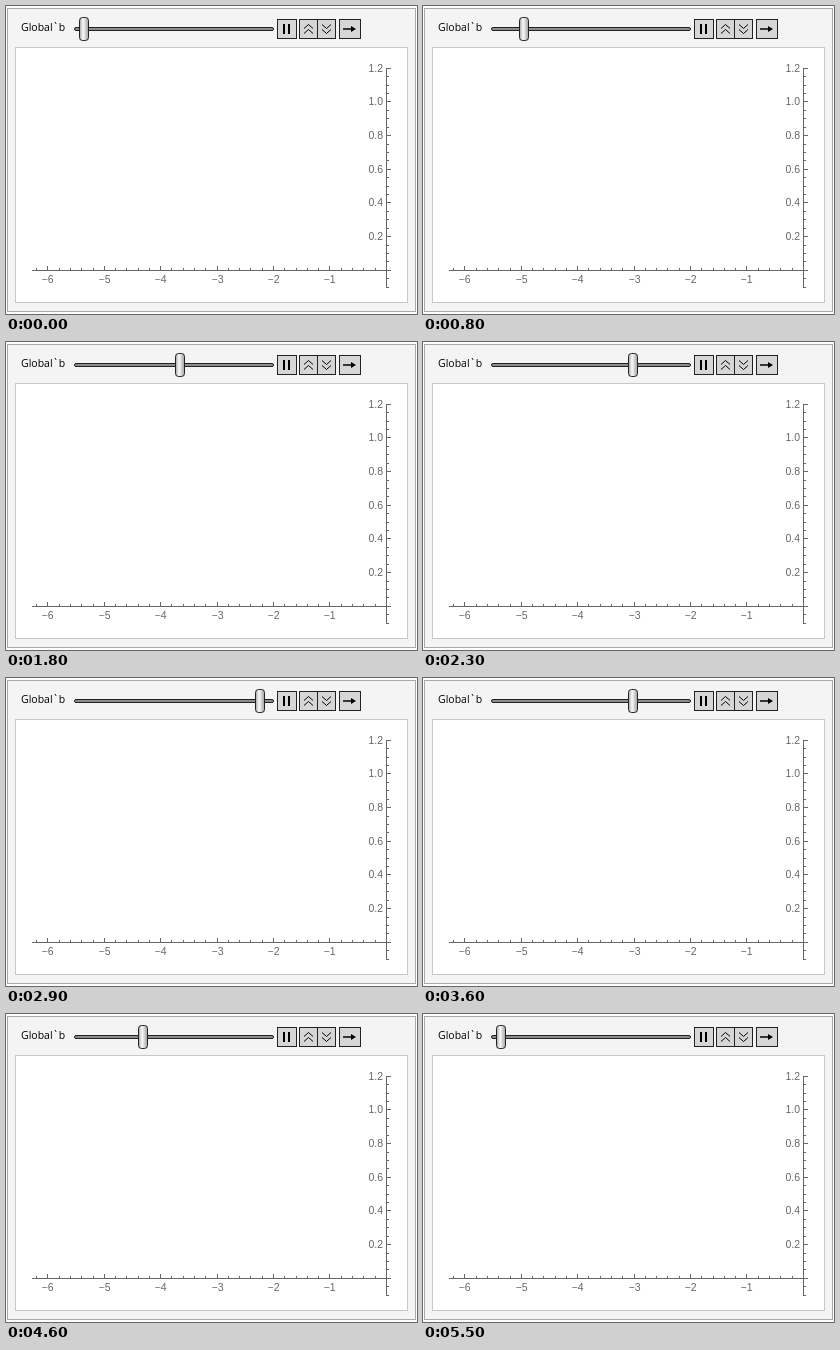
An HTML page that plays this animation: 411x308 px, repeating every 6 s.

```html
<!DOCTYPE html>
<html lang="en">
<head>
<meta charset="utf-8">
<title>Slider and axes</title>
<style>
html, body { margin: 0; width: 100%; height: 100%; overflow: hidden; background: #fff; }
svg { display: block; }
.name { font: 10.5px "Open Sans", sans-serif; }
.labels { font: 10.5px "Liberation Sans", Arial, sans-serif; fill: #666; }
.axes { stroke: #666; fill: none; shape-rendering: crispEdges; }
.button { fill: #d6d6d6; stroke: #222; }
.icon { fill: none; stroke: #000; }
</style>
</head>
<body>
<svg width="411" height="308" viewBox="0 0 411 308">
  <defs>
    <linearGradient id="metal">
      <stop offset="0" stop-color="#a4a4a4"/>
      <stop offset=".4" stop-color="#fafafa"/>
      <stop offset="1" stop-color="#a0a0a0"/>
    </linearGradient>
  </defs>
  <rect x="1.5" y="2.5" width="408" height="303" fill="#f4f4f4" stroke="#aaa"/>
  <rect x="9.5" y="41.5" width="392" height="255" fill="#fff" stroke="#c8c8c8"/>
  <text class="name" x="15" y="25">Global`b</text>

  <rect x="68.5" y="21.5" width="199" height="3" rx="1.5" fill="#8c8c8c" stroke="#222"/>
  <rect id="thumb" x=".5" y="11.5" width="9" height="23" rx="3" fill="url(#metal)" stroke="#222"/>

  <g class="button">
    <rect x="271.5" y="13.5" width="19" height="19"/>
    <rect x="293.5" y="13.5" width="18" height="19"/>
    <rect x="311.5" y="13.5" width="18" height="19"/>
    <rect x="333.5" y="13.5" width="21" height="19"/>
  </g>
  <g class="icon">
    <path stroke-width="2" d="M278 18v10M283 18v10"/>
    <path d="M298 22.5l4.5-4 4.5 4M298 27.5l4.5-4 4.5 4M316 18.5l4.5 4 4.5-4M316 23.5l4.5 4 4.5-4"/>
    <path stroke-width="1.5" d="M337 23h9"/>
    <path fill="#000" stroke="none" d="M345 20l5 3-5 3z"/>
  </g>

  <path class="axes" id="axes"/>
  <g class="labels" id="labels"></g>
</svg>
<script>
const $ = id => document.getElementById(id);
const ORIGIN = { x: 380, y: 264 }, UNIT = { x: 56.4, y: 168.3 };
const pixel = v => Math.floor(v) + 0.5;

function drawAxes() {
  let path = "M26 264.5H383M380.5 62V282", labels = "";
  const label = (x, y, anchor, text) =>
    labels += `<text x="${x}" y="${y}" text-anchor="${anchor}">${text}</text>`;

  for (let i = 1; i <= 31; i++) {
    const x = pixel(ORIGIN.x - i / 5 * UNIT.x + 0.3), major = i % 5 === 0;
    path += `M${x} 264v${major ? -4 : -2}`;
    if (major) label(x, 277, "middle", "−" + i / 5);
  }
  for (let i = -2; i <= 24; i++) {
    const y = pixel(ORIGIN.y - i / 20 * UNIT.y + 0.3), major = i % 4 === 0;
    path += `M381 ${y}h${major ? 4 : 2}`;
    if (major && i > 0) label(377, y + 3.5, "end", (i / 20).toFixed(1));
  }
  $("axes").setAttribute("d", path);
  $("labels").innerHTML = labels;
}

// The thumb steps every 100 ms, bouncing between both ends of the track.
function thumbLeft(ms) {
  const tick = Math.floor(ms / 100);
  const stepsFromEnd = tick < 30 ? 29 - tick : tick - 30;
  return stepsFromEnd > 24 ? 73 : Math.round(249 - stepsFromEnd * 51 / 7);
}

function frame() {
  $("thumb").setAttribute("x", thumbLeft(performance.now() % 6000) + 0.5);
  requestAnimationFrame(frame);
}

drawAxes();
frame();
</script>
</body>
</html>
```
